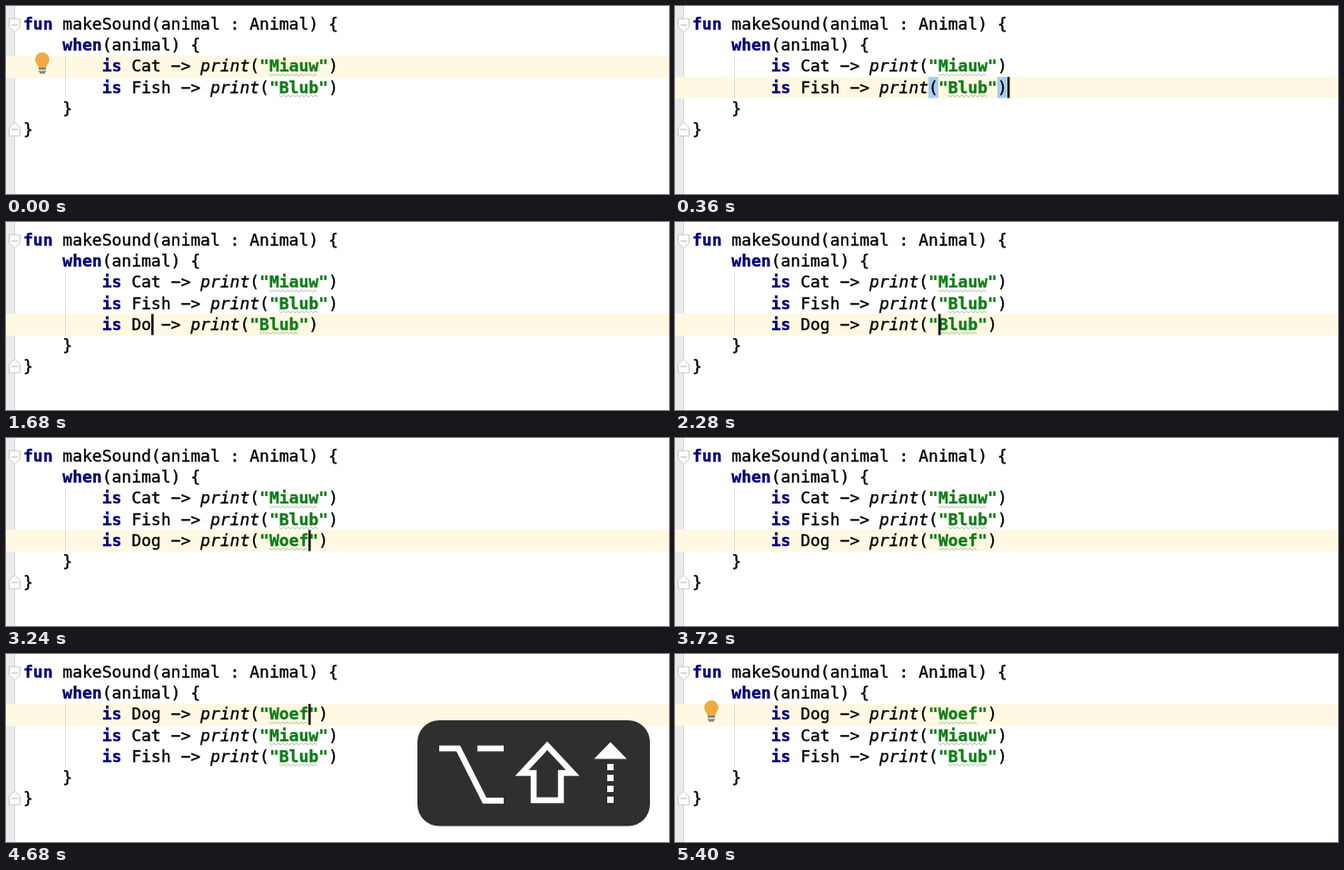
Animation, 730 px wide and 207 px high, one loop 5.52 s. Source, as an HTML page with a canvas:

```html
<!DOCTYPE html>
<html lang="en">
<head>
<meta charset="utf-8">
<title>Duplicate and move lines</title>
<style>
  html, body { margin: 0; width: 100%; height: 100%; overflow: hidden; background: #fff; }
  canvas { display: block; }
</style>
</head>
<body>
<canvas id="stage" width="730" height="207"></canvas>
<script>
const ctx = document.getElementById('stage').getContext('2d');
const STEP = 120, LOOP = 5520;
const LEFT = 19, CHAR = 10.836, TOP = 8.5, LINE = 23.2;
const colX = col => LEFT + col * CHAR;
const rowY = row => TOP + row * LINE;

const branch = (animal, sound) => `        is ${animal} -> print("${sound}")`;
const cat = branch('Cat', 'Miauw'), fish = branch('Fish', 'Blub');
const dog = branch('Dog', 'Woef');
const edit = (animal, sound) => [cat, fish, branch(animal, sound)];

// Each entry: step number, then the properties that change there.
// bulb and alpha are opacities of the bulb and the key panel.
const timeline = [
  [0, { body: [cat, fish], row: 2, col: 32, caret: false, bulb: 1, match: false, words: false, keys: '', alpha: 1 }],
  [2, { row: 3, caret: true, bulb: 0, match: true }],
  [6, { body: [cat, fish, fish], row: 4, keys: 'duplicate' }],
  [7, { col: 25, match: false }],
  [8, { col: 19 }],
  [9, { col: 11 }],
  [10, { words: true }],
  [12, { body: edit('', 'Blub'), words: false }],
  [13, { body: edit('D', 'Blub'), col: 12, alpha: 0.5 }],
  [14, { body: edit('Do', 'Blub'), col: 13, keys: '' }],
  [15, { body: edit('Dog', 'Blub'), col: 14 }],
  [17, { col: 18 }],
  [18, { col: 25 }],
  [22, { body: edit('Dog', '') }],
  [23, { body: edit('Dog', 'W'), col: 26 }],
  [24, { body: edit('Dog', 'Wo'), col: 27 }],
  [25, { body: edit('Dog', 'Woe'), col: 28 }],
  [26, { body: edit('Dog', 'Woef'), col: 29 }],
  [30, { caret: false }],
  [33, { body: [cat, dog, fish], row: 3, caret: true, keys: 'moveUp', alpha: 1 }],
  [36, { bulb: 0.65 }],
  [37, { bulb: 1 }],
  [38, { body: [dog, cat, fish], row: 2, bulb: 0 }],
  [42, { bulb: 1, caret: false }],
  [43, { alpha: 0.5 }],
  [44, { keys: '' }]
];

function stateAt(step) {
  return Object.assign({}, ...timeline.filter(([at]) => at <= step).map(([, change]) => change));
}

function fill(color, x, y, w, h) {
  ctx.fillStyle = color;
  ctx.fillRect(x, y, w, h);
}

function path(points, close) {
  ctx.beginPath();
  points.forEach(([x, y]) => ctx.lineTo(x, y));
  if (close) ctx.closePath();
}

function drawText(text, row) {
  const baseline = rowY(row) + 17.5;
  for (const { 0: token, index } of text.matchAll(/"[^"]*"|\w+|[^\s\w"]/g)) {
    const isString = token[0] === '"';
    const isKeyword = /^(fun|when|is)$/.test(token);
    const style = isString || isKeyword ? 'bold' : token === 'print' ? 'italic' : '';
    ctx.font = `${style} 18px "DejaVu Sans Mono", monospace`;
    ctx.fillStyle = ctx.strokeStyle = isString ? '#0f7d17' : isKeyword ? '#000078' : '#000';
    ctx.lineWidth = 0.35;
    // The editor shows its hyphen as a wide dash.
    [...token.replace('-', '\u2212')].forEach((char, i) => {
      ctx.fillText(char, colX(index + i), baseline);
      ctx.strokeText(char, colX(index + i), baseline);
    });
    if (isString) drawWave(colX(index + 1), colX(index + token.length - 1), baseline + 2.5);
  }
}

function drawWave(from, to, y) {
  const points = [];
  for (let x = from, i = 0; x <= to; x += 2.5, i++) points.push([x, y + (i % 2 ? 2 : 0)]);
  path(points);
  ctx.strokeStyle = '#a9c3a4';
  ctx.lineWidth = 1;
  ctx.stroke();
}

function drawFold(y, dir) {
  path([[3.5, y - 7 * dir], [15.5, y - 7 * dir], [15.5, y + 2 * dir], [9.5, y + 8 * dir], [3.5, y + 2 * dir]], true);
  ctx.fillStyle = '#fff';
  ctx.strokeStyle = '#c4c8c4';
  ctx.lineWidth = 1;
  ctx.fill();
  ctx.stroke();
  fill('#b0b4b0', 6, y - 0.5, 7, 1);
}

function drawBulb(row, opacity) {
  const y = rowY(row) + 4;
  ctx.globalAlpha = opacity;
  ctx.fillStyle = '#efaa45';
  ctx.beginPath();
  ctx.arc(40, y, 7.8, 0.75 * Math.PI, 0.25 * Math.PI);
  ctx.lineTo(44, y + 9);
  ctx.lineTo(36, y + 9);
  ctx.fill();
  fill('#777', 36, y + 9, 8, 2);
  fill('#999', 36, y + 12, 8, 2);
  fill('#777', 37, y + 14, 6, 1.5);
  ctx.globalAlpha = 1;
}

function drawCommand(cx, cy) {
  ctx.save();
  ctx.translate(cx, cy);
  for (let i = 0; i < 4; i++) {
    ctx.beginPath();
    ctx.moveTo(9.5, -19.5);
    ctx.lineTo(9.5, 19.5);
    ctx.arc(19.5, 19.5, 10, Math.PI, -Math.PI / 2, true);
    ctx.stroke();
    ctx.rotate(Math.PI / 2);
  }
  ctx.restore();
}

const keyPanels = {
  duplicate() {
    drawPanel(176);
    drawCommand(512.5, 133.5);
    ctx.font = '84px "Liberation Sans", Arial, sans-serif';
    ctx.fillText('D', 550.5, 163);
  },
  moveUp() {
    drawPanel(256);
    path([[477, 104], [498, 104], [527, 161.5], [548, 161.5]]);
    ctx.stroke();
    path([[519, 104], [548, 104]]);
    ctx.stroke();
    path([[596, 101], [568, 131], [581, 131], [581, 161], [611, 161], [611, 131], [624, 131]], true);
    ctx.stroke();
    path([[665.5, 97], [683.5, 115.5], [647.5, 115.5]], true);
    ctx.fill();
    for (let y = 121; y < 160; y += 12) ctx.fillRect(662, y, 7, 7);
  }
};

function drawPanel(width) {
  ctx.fillStyle = '#2f2f2f';
  ctx.beginPath();
  ctx.roundRect(453, 73, width, 116.5, 24);
  ctx.fill();
  ctx.fillStyle = ctx.strokeStyle = '#fff';
  ctx.lineWidth = 6.5;
}

function draw(state) {
  const { body, row, col } = state;
  const lines = ['fun makeSound(animal : Animal) {', '    when(animal) {', ...body, '    }', '}'];
  fill('#fff', 0, 0, 730, 207);
  fill('#ebebeb', 0, 0, 9, 207);
  fill('#d4d4d4', 9, 0, 1, 207);
  fill('#fff9e3', 0, Math.round(rowY(row)), 730, 24);
  fill('#dcdcdc', 65, 55, 1, Math.round(body.length * LINE));

  if (state.match) [24, 31].forEach(c => fill('#a8cdf1', colX(c), rowY(row), CHAR, LINE));
  if (state.words) [3, 4].forEach(r => fill('#e0e3e6', colX(11), rowY(r), 4 * CHAR, LINE));

  lines.forEach(drawText);
  drawFold(21, 1);
  drawFold(Math.round(rowY(lines.length - 1) + 11.5), -1);
  if (state.bulb) drawBulb(row, state.bulb);
  if (state.caret) fill('#000', Math.round(colX(col)), rowY(row), 2.5, LINE);
  if (state.keys) {
    ctx.globalAlpha = state.alpha;
    keyPanels[state.keys]();
    ctx.globalAlpha = 1;
  }
}

function tick() {
  draw(stateAt(Math.floor(performance.now() % LOOP / STEP)));
  requestAnimationFrame(tick);
}
tick();
</script>
</body>
</html>
```
